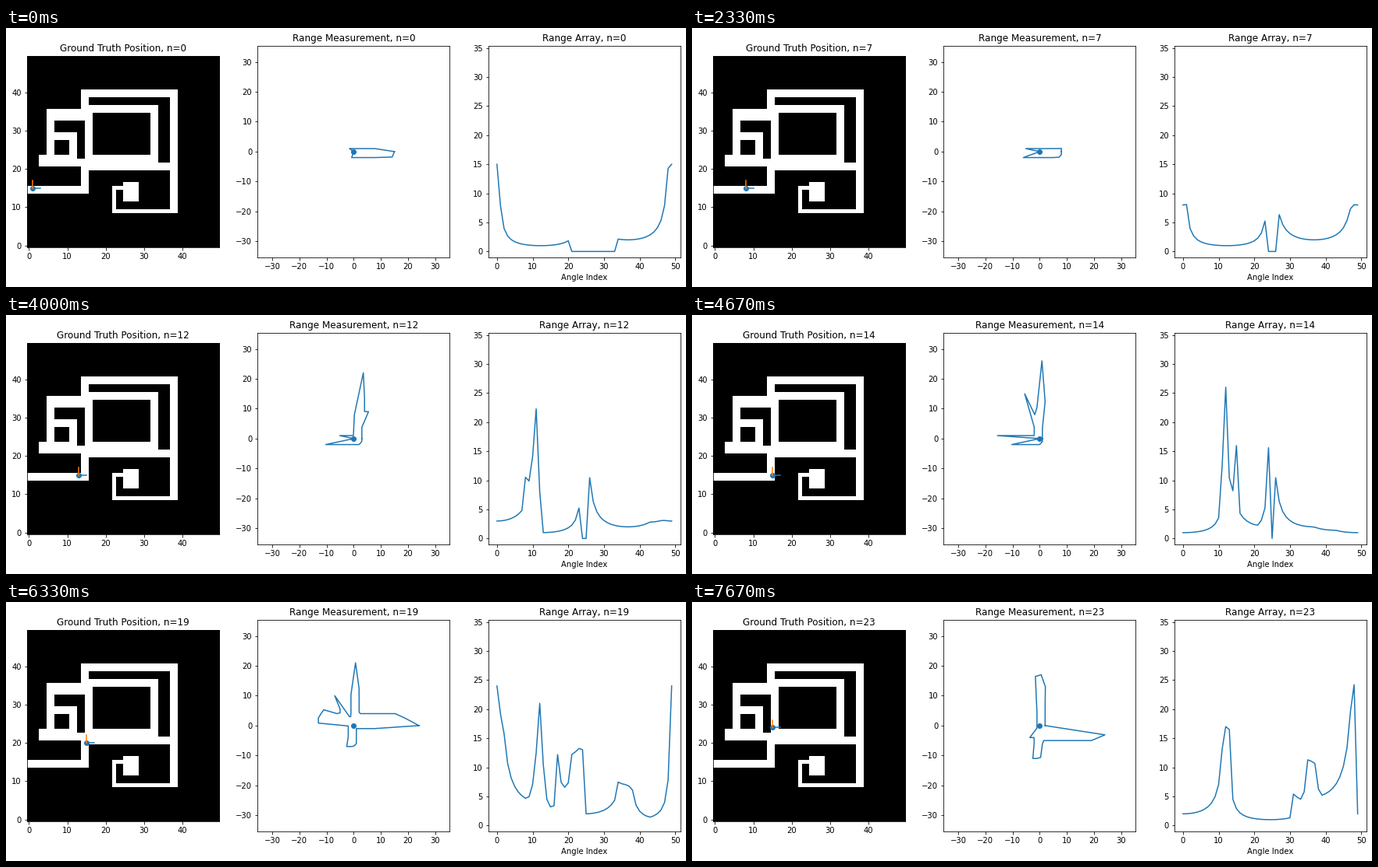
Recreate the animation shown at these times as a matplotlib script. Size 871 by 333 pixels, loop 8 s.

```python
import numpy as np
import matplotlib.pyplot as plt
from matplotlib.animation import FuncAnimation

W, H, DPI = 871, 333, 72
SCANS, FRAMES, LOOP_MS = 24, 160, 8000
SIZE, RAYS, CORNER_STEP = 50, 50, 14
REACH = SIZE / np.sqrt(2)

plt.rcParams.update({"font.family": "DejaVu Sans", "font.size": 10,
                     "axes.titlesize": 12})

free = np.zeros((SIZE, SIZE), dtype=bool)


def carve(width, start, *turns):
    """Sweep a square brush, the turns giving the next x, then y, and so on."""
    spot = list(start)
    for k, goal in enumerate(turns):
        (x0, y0), spot[k % 2] = spot, goal
        xs, ys = sorted((x0, spot[0])), sorted((y0, spot[1]))
        free[ys[0]:ys[1] + width, xs[0]:xs[1] + width] = True


carve(2, (0, 14), 14, 21, 3, 22, 11, 28, 5, 22, 5, 34,
      14, 39, 37, 20, 15, 35, 32, 22, 15)
carve(3, (5, 33), 12)
carve(2, (37, 20), 37, 9)
carve(1, (37, 9), 22, 15, 25)
carve(4, (25, 12), 25, 13)

angles = np.linspace(0, 2 * np.pi, RAYS)


def blocked(i, j):
    i, j = (np.clip(v, 0, SIZE - 1).astype(int) for v in (i, j))
    return ~free[j, i]


def cast(px, py, angle):
    """Distance to the first wall edge, or 0 when the ray leaves the map."""
    c, s = np.cos(angle), np.sin(angle)
    steps = np.arange(1, SIZE + 1)
    # Crossings of vertical, horizontal and diagonal lattice lines
    t = np.sort(np.concatenate(
        [steps / max(abs(d), 1e-9) for d in (c, s, c - s)]))
    x, y = np.round(px + t * c, 9), np.round(py + t * s, 9)
    hit = (blocked(np.floor(x), np.floor(y))
           & blocked(np.ceil(x), np.ceil(y)))
    if not hit.any():
        return 0.0
    k = np.argmax(hit)
    left_limit = -1 if s > 0 else 0
    return t[k] if x[k] >= left_limit else 0.0


def position(n):
    return 1 + min(n, CORNER_STEP), 15 + max(n - CORNER_STEP, 0)


fig = plt.figure(figsize=((W + 0.01) / DPI, (H + 0.01) / DPI), dpi=DPI,
                 facecolor="white")

# Panel sizes follow the default margins of a 1080 x 360 figure
PANEL_W, PANEL_H = 0.775 * 1080 / 3.4, 0.755 * 360
ax_map, ax_scan, ax_array = axes = [
    fig.add_axes([(27 + 1.2 * k * PANEL_W) / W, 38 / H,
                  PANEL_W / W, PANEL_H / H]) for k in range(3)]

ax_map.imshow(free, cmap="gray", origin="lower", interpolation="nearest")
robot = ax_map.scatter([0], [0], color="C0")
heading, = ax_map.plot([], [], "C0")
side, = ax_map.plot([], [], "C1")
ax_map.set(xlim=(-0.5, SIZE - 0.5), ylim=(-0.5, SIZE - 0.5))

ax_scan.scatter([0], [0], color="C0")
outline, = ax_scan.plot([], [], "C0")
ax_scan.set(xlim=(-REACH, REACH), ylim=(-REACH, REACH))

curve, = ax_array.plot([], [], "C0")
margin = 0.05 * (RAYS - 1)
ax_array.set(xlim=(-margin, RAYS - 1 + margin), ylim=(-1, REACH),
             xlabel="Angle Index")


def show_scan(n):
    x, y = position(n)
    ranges = np.array([cast(x, y, a) for a in angles])
    robot.set_offsets([(x, y)])
    heading.set_data([x, x + 2], [y, y])
    side.set_data([x, x], [y, y + 2])
    outline.set_data(ranges * np.cos(angles), ranges * np.sin(angles))
    curve.set_data(np.arange(RAYS), ranges)
    ax_map.set_title(f"Ground Truth Position, n={n}")
    ax_scan.set_title(f"Range Measurement, n={n}")
    ax_array.set_title(f"Range Array, n={n}")


def update(i):
    # Each frame shows the scan reached by the time it ends
    show_scan(((i + 1) * SCANS - 1) // FRAMES)
    return robot, heading, side, outline, curve


def pad_contents(pad=0.1):
    """Shift all panels so their contents start pad inches from the corner."""
    box = fig.get_tightbbox()
    dx, dy = (pad - box.x0) * DPI / W, (pad - box.y0) * DPI / H
    for ax in axes:
        ax.set_position(ax.get_position(original=True).translated(dx, dy))


show_scan(0)
pad_contents()
anim = FuncAnimation(fig, update, frames=FRAMES, interval=LOOP_MS / FRAMES,
                     repeat=True, repeat_delay=0, blit=False)
plt.show()
```
